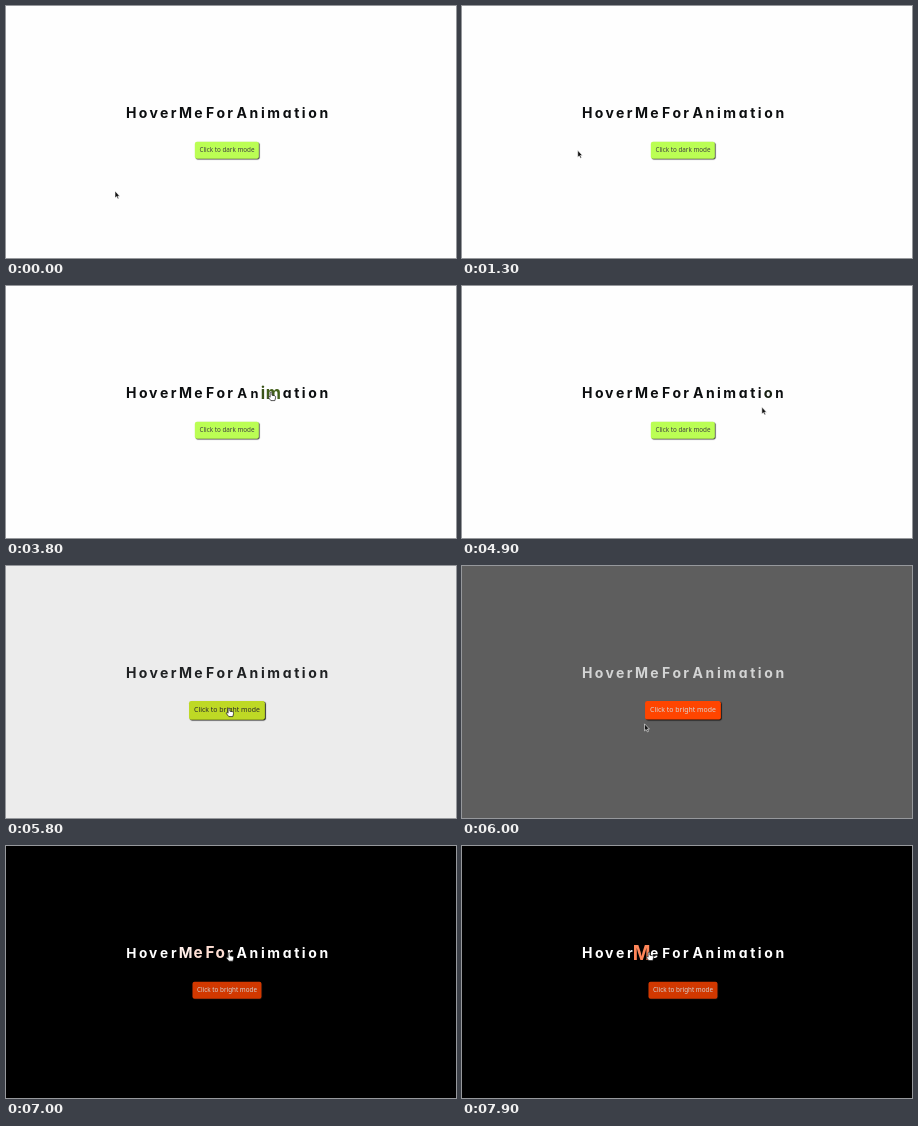
Write an HTML page that moves like this. It is 450x252 px and loops after 8 s.

```html
<!DOCTYPE html>
<html lang="en">
<head>
<meta charset="utf-8">
<title>Hover letters</title>
<style>
html, body { margin: 0; width: 100%; height: 100%; overflow: hidden; }
.word {
  position: absolute; top: 97px; white-space: nowrap;
  font: 700 14px/20px Inter, "Open Sans", sans-serif;
  font-feature-settings: "cv11";
}
.word span { display: inline-block; transform-origin: calc(50% - 1.2px) 55%; }
#button {
  position: absolute; left: 221px; top: 144.3px; box-sizing: border-box;
  height: 16.5px; padding: 0 4.6px; border-radius: 2px; white-space: nowrap;
  font: 6.3px/16.5px "Noto Sans", "Open Sans", sans-serif;
  box-shadow: .8px .8px .8px #111;
}
svg { position: absolute; left: 0; top: 0; overflow: visible; }
</style>
</head>
<body>
<div id="button"></div>
<svg width="1" height="1">
  <g id="pointer" stroke-linejoin="round">
    <path id="arrow" d="M0 0V7L1.6 5.6L2.8 8L3.9 7.5L2.8 5.2H4.8Z" fill="#111" stroke="#fff" stroke-width=".6"/>
    <path id="hand" d="M-.9 .6Q0-.8 .9 .6V3.2L3.8 3.8Q4.8 4.2 4.5 5.8L3.8 8.6H-.2L-2.6 5.6Q-2.9 4.4-1.8 4.6L-.9 5.2Z" fill="#fff" stroke="#111" stroke-width=".7"/>
  </g>
</svg>
<script>
const $ = id => document.getElementById(id);
const mix = (a, b, k) => a + (b - a) * k;
const mixColor = (a, b, k) => a.map((v, i) => mix(v, b[i], k));
const rgb = c => `rgb(${c.map(Math.round)})`;

// Linear interpolation over [time, ...values] keys
function track(keys, t) {
  const n = keys.findIndex(k => k[0] > t);
  if (n < 0) return keys[keys.length - 1].slice(1);
  if (n === 0) return keys[0].slice(1);
  const a = keys[n - 1], b = keys[n], k = (t - a[0]) / (b[0] - a[0]);
  return a.slice(1).map((v, i) => mix(v, b[i + 1], k));
}

const path = [
  [0, 109, 185], [1050, 109, 185], [1500, 121, 112], [1800, 131, 107],
  [1900, 144, 105], [2050, 154, 103], [2100, 160, 98], [2250, 180, 98],
  [2300, 183, 104], [2500, 193, 106], [2750, 212, 106], [3000, 214, 107],
  [3350, 236, 107], [3600, 255, 106], [3800, 265, 106], [4000, 277, 107],
  [4350, 312, 107], [4600, 314, 107], [4900, 300, 121], [5350, 226, 139],
  [5500, 223, 142], [5860, 223, 142], [6000, 183, 158], [6200, 95, 129],
  [6400, 95, 129], [6600, 121, 110], [6850, 180, 107], [7200, 280, 106],
  [7500, 222, 106], [7720, 188, 106], [7900, 187, 106]
];
const night = [[5740, 0], [5800, .067], [6000, .63], [6200, .915], [6400, 1]];
const inkShift = [[5780, 0], [6000, .82], [6200, 1]];
const paint = [[5750, 0], [5800, .2], [6000, 1]];
const press = [[5340, 0], [5480, 1], [6000, 1], [6150, 0]];

const WHITE = [255, 255, 255], BLACK = [0, 0, 0];
const PAGE = [254, 254, 254], INK = [12, 14, 16];
const LIME = [173, 255, 47], ORANGE = [255, 69, 0];

const letters = [];
for (const [text, left, gap] of [
  ["Hover", 120, 2.2], ["Me", 173, 2.3], ["For", 200, 2.2], ["Animation", 230.5, 2.6]
]) {
  const word = document.createElement("div");
  word.className = "word";
  word.style.left = left + "px";
  word.style.letterSpacing = gap + "px";
  for (const char of text) {
    const el = document.createElement("span");
    el.textContent = char;
    word.append(el);
    letters.push({ el });
  }
  document.body.insertBefore(word, $("button"));
}
for (const l of letters) {
  const box = l.el.getBoundingClientRect();
  l.left = box.left;
  l.right = box.right;
}

const over = (l, [x, y]) => y > 100 && y < 117 && x >= l.left && x < l.right;

// Recent hover stretches a letter, older hover makes it recoil
function stretch(l, trail) {
  const sum = trail.reduce((s, p, i) =>
    s + (over(l, p) ? (i < 16 ? .071 : -.018) : 0), 0);
  return Math.min(sum, 1.1);
}

function draw(t) {
  const [dark] = track(night, t), [shift] = track(inkShift, t);
  const [tint] = track(paint, t), [hover] = track(press, t);
  const ink = mixColor(INK, WHITE, shift), accent = mixColor(LIME, ORANGE, tint);
  document.body.style.background = rgb(mixColor(PAGE, BLACK, dark));

  const trail = Array.from({ length: 45 }, (_, i) => track(path, t - i * 10));
  for (const l of letters) {
    const s = stretch(l, trail);
    l.el.style.transform = `scale(${1 + .33 * s}, ${1 + .4 * s})`;
    l.el.style.color = rgb(mixColor(ink, accent, Math.max(0, s * .6)));
  }

  const button = $("button");
  button.textContent = `Click to ${t < 5740 ? "dark" : "bright"} mode`;
  button.style.background = rgb(accent);
  button.style.color = rgb(mixColor([25, 25, 25], WHITE, shift));
  button.style.opacity = mix(.82, 1, hover);
  button.style.transform = `translate(-50%, -50%) scale(${1 + .1 * hover})`;

  const [x, y] = trail[0];
  const onButton = Math.abs(x - 221) < 35 && Math.abs(y - 144) < 9;
  const pointing = onButton || letters.some(l => over(l, trail[0]));
  $("pointer").setAttribute("transform", `translate(${x} ${y})`);
  $("arrow").style.display = pointing ? "none" : "";
  $("hand").style.display = pointing ? "" : "none";
}

function loop() {
  draw(performance.now() % 8000);
  requestAnimationFrame(loop);
}
loop();
</script>
</body>
</html>
```
